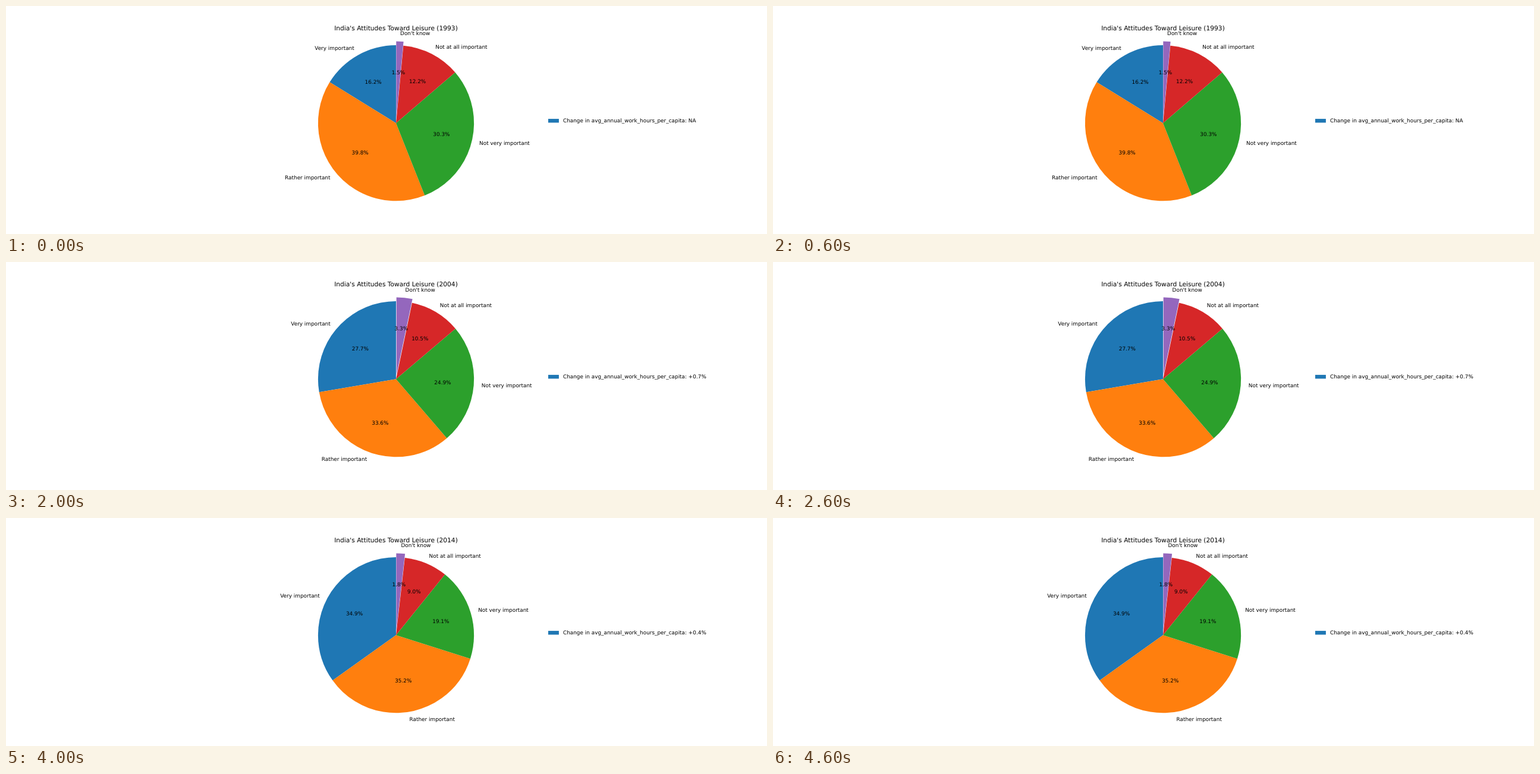
An HTML page with a canvas for the animation above (5 s loop, 1280x384 px).

```html
<!DOCTYPE html>
<html lang="en">
<head>
<meta charset="utf-8">
<title>Attitudes toward leisure</title>
<style>
html, body { margin: 0; background: #fff; overflow: hidden; }
canvas { display: block; }
</style>
</head>
<body>
<canvas width="1280" height="384"></canvas>
<script>
const ctx = document.querySelector('canvas').getContext('2d');
const labels = ['Very important', 'Rather important', 'Not very important', 'Not at all important', "Don't know"];
const colors = ['#1f77b4', '#ff7f0e', '#2ca02c', '#d62728', '#9467bd'];
const surveys = [
  { year: 1993, shares: [16.2, 39.8, 30.3, 12.2, 1.5], change: 'NA' },
  { year: 1998, shares: [11.1, 24.9, 40.1, 21.9, 2.0], change: '+0.2%' },
  { year: 2004, shares: [27.7, 33.6, 24.9, 10.5, 3.3], change: '+0.7%' },
  { year: 2010, shares: [23.6, 36.1, 24.2, 12.6, 3.4], change: '+0.7%' },
  { year: 2014, shares: [34.9, 35.2, 19.1, 9.0, 1.8], change: '+0.4%' }
];
// Chart space is 2000 x 600 at 100 dpi, scaled down to the stage.
const SCALE = 0.64, CX = 1025, CY = 308.1, R = 204.9, HOLD = 1000;

function text(str, x, y, align, points = 10) {
  ctx.font = `${points * 100 / 72}px "DejaVu Sans", sans-serif`;
  ctx.textAlign = align;
  ctx.fillStyle = '#000';
  ctx.fillText(str, x, y);
}

function draw({ year, shares, change }) {
  ctx.setTransform(1, 0, 0, 1, 0, 0);
  ctx.fillStyle = '#fff';
  ctx.fillRect(0, 0, 1280, 384);
  ctx.scale(SCALE, SCALE);
  ctx.textRendering = 'geometricPrecision';

  const total = shares.reduce((a, b) => a + b);
  let start = -Math.PI / 2;
  const slices = shares.map((share, i) => {
    const end = start - share / total * 2 * Math.PI;
    const mid = (start + end) / 2;
    const offset = i === 4 ? 0.05 : 0;
    const at = r => [CX + Math.cos(mid) * R * (r + offset), CY + Math.sin(mid) * R * (r + offset)];
    const [x, y] = at(0);
    ctx.fillStyle = colors[i];
    ctx.beginPath();
    ctx.moveTo(x, y);
    ctx.arc(x, y, R, start, end, true);
    ctx.fill();
    start = end;
    return { share, at };
  });

  slices.forEach(({ share, at }, i) => {
    const [x, y] = at(1.1), [px, py] = at(0.6);
    text(labels[i], x, y + 4, x > CX ? 'left' : 'right');
    text(share.toFixed(1) + '%', px, py + 4, 'center');
  });

  text(`India's Attitudes Toward Leisure (${year})`, CX, 63.7, 'center', 12);
  ctx.fillStyle = colors[0];
  ctx.fillRect(1425, 297, 28, 10);
  text('Change in avg_annual_work_hours_per_capita: ' + change, 1464, 307, 'left');
}

const t0 = performance.now();
function tick() {
  const step = Math.floor((performance.now() - t0) / HOLD) % surveys.length;
  draw(surveys[step]);
  requestAnimationFrame(tick);
}
tick();
</script>
</body>
</html>
```
